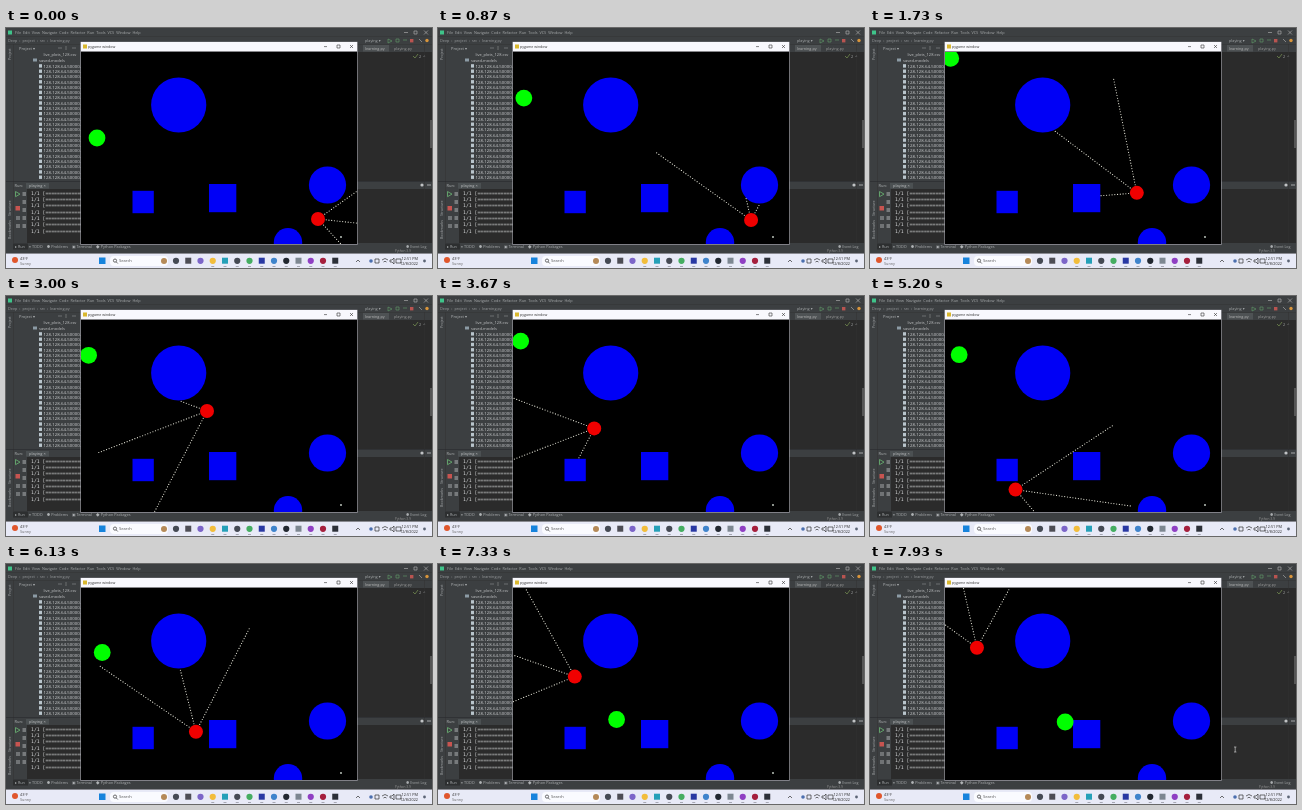
Write an HTML page with a canvas that moves like this. It is 426 by 240 pixels and loops after 8000 ms.

```html
<!DOCTYPE html>
<html lang="en">
<head>
<meta charset="utf-8">
<title>Obstacle avoidance</title>
<style>
html, body { margin: 0; width: 100%; height: 100%; overflow: hidden; background: #2b2b2b; }
svg, canvas { position: absolute; left: 0; top: 0; display: block; }
canvas { left: 75px; top: 24px; }
text { font-family: "Open Sans", Inter, sans-serif; white-space: pre; }
.mono { font-family: "DejaVu Sans Mono", monospace; }
</style>
</head>
<body>
<svg id="desk" width="426" height="240" viewBox="0 0 426 240"></svg>
<canvas id="game" width="276" height="192"></canvas>
<script>
const desk = document.getElementById('desk');
const SVG = 'http://www.w3.org/2000/svg';

function add(tag, attrs, content) {
  const el = document.createElementNS(SVG, tag);
  for (const key in attrs) el.setAttribute(key, attrs[key]);
  if (content) el.textContent = content;
  desk.append(el);
  return el;
}
const rect = (x, y, width, height, fill, rx = 0) => add('rect', { x, y, width, height, fill, rx });
const disc = (cx, cy, r, fill) => add('circle', { cx, cy, r, fill });
const label = (x, y, str, fill = '#a8abad', size = 4, cls = '') =>
  add('text', { x, y, fill, 'font-size': size, class: cls }, str);
const sideLabel = (y, str) =>
  add('text', { transform: `translate(5 ${y}) rotate(-90)`, fill: '#a8abad', 'font-size': 3.6 }, str);
const clockLabel = (y, str) =>
  add('text', { x: 412, y, fill: '#222', 'font-size': 3.8, 'text-anchor': 'end' }, str);
const line = (d, stroke, width = 0.6) => add('path', { d, stroke, fill: 'none', 'stroke-width': width });

function drawEditor() {
  rect(0, 0, 426, 225, '#3c3f41');
  rect(351, 24, 75, 129, '#2b2b2b');
  rect(21, 161, 405, 54, '#2b2b2b');
  rect(0, 8.5, 426, 0.5, '#323232');
  rect(0, 16, 426, 0.5, '#323232');
  rect(7, 16, 0.5, 199, '#323232');
  rect(418.5, 16, 0.5, 199, '#323232');
  rect(0, 153, 426, 0.6, '#292b2d');

  rect(2, 2.5, 4, 4, '#3fc48a');
  label(9, 6, 'File  Edit  View  Navigate  Code  Refactor  Run  Tools  VCS  Window  Help', '#a8abad', 3.8);
  label(2, 14, 'Deep  ›  project  ›  src  ›  learning.py', '#9b9ea0', 3.8);
  line('M398 4.5h4 M408 3h3v3h-3z M418 2.5l4 4 M422 2.5l-4 4', '#b8b8b8');
  label(359, 14, 'playing ▾', '#a8abad', 3.8);
  line('M382 11l4 2-4 2z M390 11h3v3h-3z M397 12h4', '#62a06a');
  rect(404, 11, 3.4, 3.4, '#b95450');
  line('M413 11l3 3', '#b8b8b8');
  disc(421, 12.5, 1.7, '#d9953b');

  rect(357, 17, 26, 6.5, '#4e5254');
  label(359, 22, 'learning.py', '#bbb', 3.8);
  label(388, 22, 'playing.py', '#999', 3.8);
  line('M407 28l2 2 3-4', '#89a85b');
  label(413, 30, '2  ^', '#a8abad', 3.8);
  rect(424, 92, 2, 28, '#565656');

  label(13, 22, 'Project ▾', '#b5b8ba', 4);
  line('M52 20h4 M60 18v4 M66 20h4', '#8d9092');
  label(37.5, 28, 'live_plots_128.csv', '#c4c6c8', 4);
  rect(27, 30.5, 4, 3, '#8c9ba5');
  label(33, 33.6, 'saved-models', '#c4c6c8', 4);
  for (let i = 0; i < 22; i++) {
    const y = 36.2 + i * 5.3;
    rect(33, y, 3, 3.4, '#b9c5cc');
    label(37.5, y + 3.4, '128-128-64-50000-' + (25000 + i * 25000), '#d0d2d4', 4.3);
  }
  sideLabel(32, 'Project');
  sideLabel(188, 'Structure');
  sideLabel(211, 'Bookmarks');
}

function drawConsole() {
  label(8.5, 159, 'Run:', '#b5b8ba', 4);
  rect(20, 155, 23, 5.6, '#4b5052');
  label(23, 159, 'playing ×', '#c0c2c4', 4);
  disc(416, 157, 1.6, '#c0c2c4');
  line('M421 157h4', '#c0c2c4', 0.8);
  for (let i = 0; i < 7; i++)
    label(25, 166.8 + i * 6.3, '1/1 [==============================]', '#dcdedf', 4.8, 'mono');
  line('M9.5 163.5l4.5 2.6-4.5 2.6z', '#62a06a', 1);
  rect(9.5, 178, 4.5, 4.5, '#c75450');
  for (let i = 0; i < 5; i++) {
    const y = 165 + i * 8;
    line(`M16.5 ${y}h3.5m-3.5 2h3.5`, '#c0c2c4', 0.9);
    if (i > 2) line(`M10 ${y}h4m-4 2h4`, '#b0b3b5', 0.9);
  }
  rect(0, 215, 426, 10, '#3c3f41');
  rect(7, 215.5, 15, 6, '#2d2f30');
  label(9, 219.8, '▸ Run    ≡ TODO    ● Problems    ▣ Terminal    ◆ Python Packages', '#b0b3b5', 3.8);
  label(400, 219.8, '● Event Log', '#a8abad', 3.6);
  label(389, 224.3, 'Python 3.9', '#999', 3.2);
}

function drawTaskbar() {
  rect(0, 225.5, 426, 14.5, '#e8eaf7');
  disc(9, 232, 3, '#e0562c');
  label(14, 231.8, '43°F', '#333', 3.8);
  label(14, 236.6, 'Sunny', '#666', 3.8);
  rect(93, 229.5, 6.5, 6.5, '#1683dc');
  rect(104, 228, 58, 10, '#fafbff', 4);
  add('circle', { cx: 109, cy: 232.6, r: 1.6, fill: 'none', stroke: '#333', 'stroke-width': 0.7 });
  line('M110.2 233.9l1.6 1.6', '#333', 0.7);
  label(113, 234.4, 'Search', '#555', 4.1);
  disc(158, 233, 3, '#b58a58');

  const icons = ['#454a54', '#4d4d55', '#7c65c8', '#f2bd3b', '#25a0b8', '#454a54', '#45ad62',
    '#2938a3', '#3f84cc', '#222831', '#7d8791', '#8f3fc3', '#a51f3d', '#2c3038'];
  icons.forEach((fill, i) => {
    const x = 170 + i * 12.25;
    if (i % 3 === 1 || i === 7) rect(x - 3, 229.7, 6, 6, fill);
    else disc(x, 232.8, 3.1, fill);
    if (i > 2) rect(x - 1.5, 238, 3, 0.7, '#8a8d99');
  });
  line('M350 234l2-2 2 2', '#333', 0.7);
  disc(365, 233, 1.8, '#4b6fae');
  line('M369 231h4v4h-4z M376 232q3-3 6 0 M377.5 234q1.5-1.5 3 0 M384 232h2l2-2v6l-2-2h-2z M390 231h5v4h-5z', '#333', 0.7);
  clockLabel(231.7, '12:51 PM');
  clockLabel(237, '12/8/2022');
  disc(418.5, 233, 1.4, '#5b6475');
}

function drawWindowFrame() {
  rect(74.5, 13.8, 277, 203, '#b9bac2');
  rect(75, 14, 276, 9.6, '#f8f8fd');
  rect(75, 23.6, 276, 192.6, '#000');
  rect(77, 16.5, 4, 4, '#d9b82f');
  label(82, 20.2, 'pygame window', '#333', 3.6);
  line('M318 18.6h3 M331 17h3v3h-3z M344 17l3 3 M347 17l-3 3', '#333', 0.6);
}

drawEditor();
drawConsole();
drawTaskbar();
drawWindowFrame();
const beam = line('M364 183h2.4 M365.2 183v5 M364 188h2.4', '#ddd');

const ctx = document.getElementById('game').getContext('2d');
ctx.translate(-75, -24);

const BLUE = '#0000f6', GREEN = '#0f0', RED = '#f00000', SONAR = '#eeeee0';
const balls = [[172.7, 77, 27.6], [321.5, 157, 18.6], [282, 214.3, 14.2]];
const boxes = [[126.5, 162.8, 21.3, 22.4], [203, 156, 27.3, 28.2]];

// time, x, y, heading in degrees, forward speed
const carPath = [
  [0, 312, 191, 6, 70], [0.33, 334, 193, 6, 0], [0.95, 312, 192, -120, 0],
  [1.73, 267, 165, -143, 65], [2.6, 222, 131, -143, 65], [3, 201, 115, -201, 70],
  [4, 134, 141, -201, 70], [4.33, 112, 150, -247, 85], [6.13, 190, 168, -464, 80],
  [7.33, 137, 112.7, -521, 70], [7.93, 107, 84, -463, 70], [8, 106, 80, -457, 70]
];
// time, x, y
const catPath = [
  [0, 91, 110], [1.73, 80.7, 30.3], [3, 82.6, 59.3], [4.33, 82.8, 31],
  [6.13, 96, 88.3], [7.33, 178.5, 155.5], [8, 197, 158.3]
];

const rad = deg => deg * Math.PI / 180;
const mix = (a, b, u) => a + (b - a) * u;

function segment(path, t) {
  let i = 0;
  while (i < path.length - 2 && t >= path[i + 1][0]) i++;
  const a = path[i], b = path[i + 1];
  return { a, b, span: b[0] - a[0], u: (t - a[0]) / (b[0] - a[0]) };
}

function hermite(p, q, m, n, u) {
  const v = 1 - u;
  return v * v * (1 + 2 * u) * p + u * u * (3 - 2 * u) * q + u * v * (v * m - u * n);
}

function carAt(t) {
  const { a, b, span, u } = segment(carPath, t);
  const slope = (key, trig) => trig(rad(key[3])) * key[4] * span;
  return {
    x: hermite(a[1], b[1], slope(a, Math.cos), slope(b, Math.cos), u),
    y: hermite(a[2], b[2], slope(a, Math.sin), slope(b, Math.sin), u),
    heading: mix(a[3], b[3], u)
  };
}

function catAt(t) {
  const { a, b, u } = segment(catPath, t);
  return [mix(a[1], b[1], u), mix(a[2], b[2], u), 8.4];
}

function blocked(x, y, cat) {
  return x < 75 || x > 351 || y < 24 || y > 216 ||
    [...balls, cat].some(([cx, cy, r]) => Math.hypot(x - cx, y - cy) < r) ||
    boxes.some(([bx, by, w, h]) => x > bx && x < bx + w && y > by && y < by + h);
}

function dot(x, y, r, color) {
  ctx.fillStyle = color;
  ctx.beginPath();
  ctx.arc(x, y, r, 0, 2 * Math.PI);
  ctx.fill();
}

function drawSonar(car, angle, cat) {
  const dx = Math.cos(rad(angle)), dy = Math.sin(rad(angle));
  for (let j = 1; j <= 40; j++) {
    const reach = 5.5 + 2.76 * j;
    const x = car.x + dx * reach, y = car.y + dy * reach;
    if (blocked(x, y, cat)) break;
    dot(x, y, 0.58, SONAR);
  }
}

function render(t) {
  const car = carAt(t), cat = catAt(t);
  ctx.fillStyle = '#000';
  ctx.fillRect(75, 24, 276, 192);
  balls.forEach(ball => dot(...ball, BLUE));
  ctx.fillStyle = BLUE;
  boxes.forEach(box => ctx.fillRect(...box));
  dot(...cat, GREEN);
  dot(car.x, car.y, 7, RED);
  for (const spread of [-41.5, 0, 41.5]) drawSonar(car, car.heading + spread, cat);
  const pointerLeft = t > 7.85;
  if (!pointerLeft) dot(335, 209, 0.9, '#cfd8cf');
  beam.style.visibility = pointerLeft ? 'visible' : 'hidden';
}

const FPS = 15, LOOP = 8000;
const start = performance.now();
function tick() {
  const ms = (performance.now() - start) % LOOP;
  render(Math.floor((ms + 4) * FPS / 1000) / FPS);
  requestAnimationFrame(tick);
}
tick();
</script>
</body>
</html>
```
